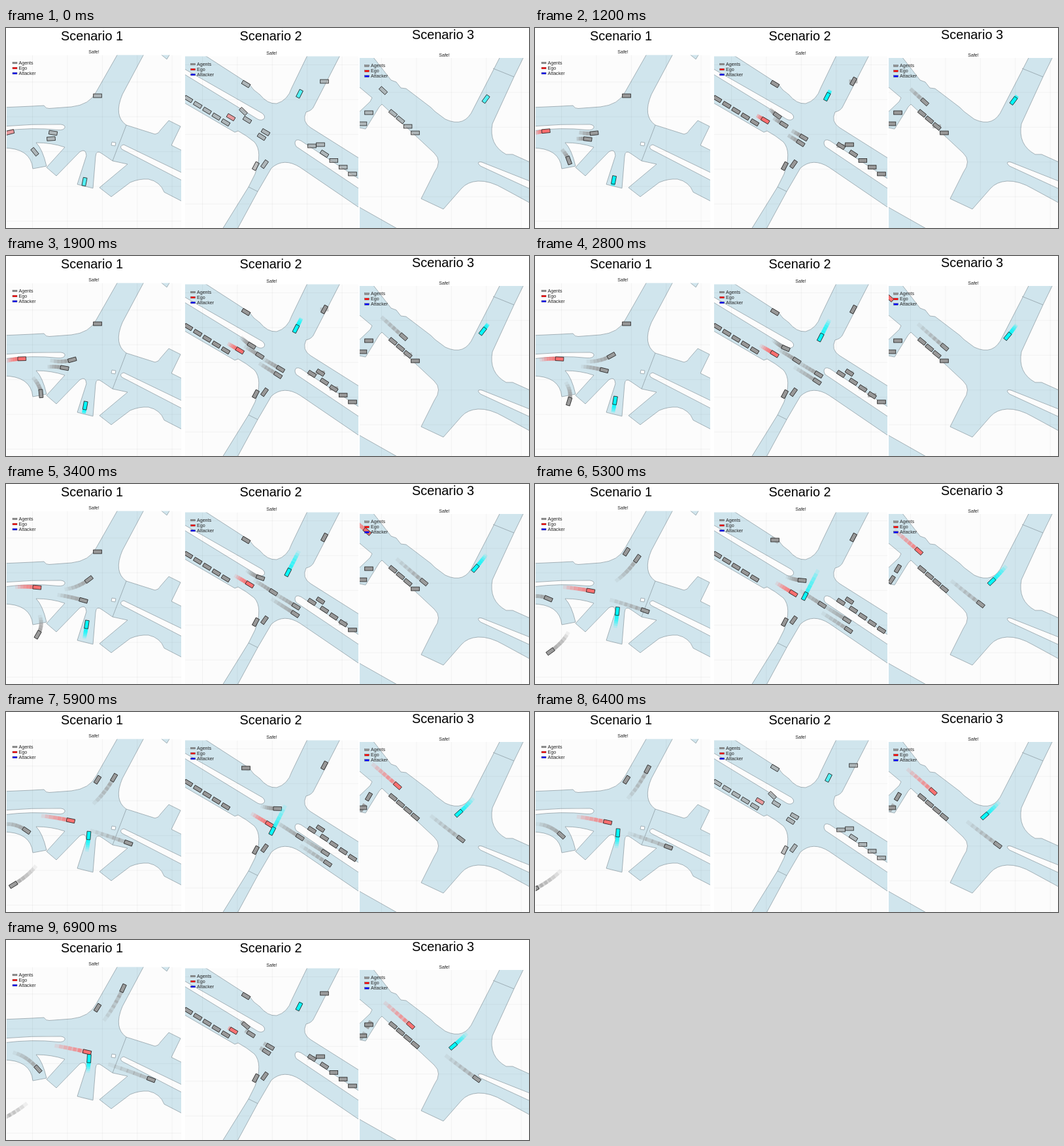
Animation of 800 by 307 pixels, one loop 7000 ms. Source, as an HTML page with a canvas:

```html
<!DOCTYPE html>
<html lang="en">
<head>
<meta charset="utf-8">
<title>Driving scenarios</title>
<style>
html, body { margin: 0; width: 100%; height: 100%; overflow: hidden; background: #fff; }
canvas { display: block; }
</style>
</head>
<body>
<canvas id="stage" width="800" height="307"></canvas>
<script>
const ctx = document.getElementById('stage').getContext('2d');
const ROAD = '#d0e5ed', GROUND = '#fcfcfc', EDGE = '#87969d';
const AGENT = '#989898', EGO = '#fb6c6c', ATTACKER = '#00f8fa';
const LAST = 66, TRAIL = 18, GAP = 3;

const mix = (a, b, u) => a + (b - a) * u;
// Attackers start from rest and slow down again
const ease = u => u * u * (2.2 - 1.2 * u);
const steady = u => u;

// A car following the parabola through its start, middle and end point
function driver(colour, [x0, y0], [x1, y1], [x2, y2], pace = steady) {
  const curve = (a, b, c, u) => a + u * (4 * b - 3 * a - c) + 2 * u * u * (a - 2 * b + c);
  const slope = (a, b, c, u) => 4 * b - 3 * a - c + 4 * u * (a - 2 * b + c);
  return {
    colour,
    pose(step) {
      const u = pace(step / LAST);
      return [curve(x0, x1, x2, u), curve(y0, y1, y2, u),
        Math.atan2(slope(y0, y1, y2, u), slope(x0, x1, x2, u))];
    }
  };
}

// A standing car, level at first, that snaps to its lane's angle between two steps
function parked(x, y, degrees, turn = 0, back = Infinity) {
  const angle = degrees * Math.PI / 180;
  return { colour: AGENT, pose: step => [x, y, step >= turn && step < back ? angle : 0] };
}

function row(count, [x0, y0], [x1, y1], degrees, turn = 0, stagger = 0) {
  return Array.from({ length: count }, (_, i) => {
    const u = i / (count - 1);
    return parked(mix(x0, x1, u), mix(y0, y1, u), degrees, turn + i * stagger);
  });
}

const panels = [
  {
    title: 'Scenario 1', tx: 131.5, ty: 19, x: 1, y: 41.5, w: 267, safe: 134.5, lx: 10, grid: [40, 29],
    roads: 'M-5 122L40 120 58 119Q61 124 66 123.5L100 121Q128 118 138 98L172 38H212L178 102Q164 135 184 149' +
      'L228 163Q234 162 236 157L249 142 267 151 253 180 273 190V268L242 252Q236 236 218 232 204 231 190 237' +
      'L161 259 143 245 186 209 163 204 147 193Q138 186 137 197L133 246 109 240 123 196Q122 184 113 190' +
      'L77 227 62 214 90 183Q70 176 46 176 56 186 62 212L41 216Q38 184 -5 184Z' +
      'M234 38L246 48 252 38Z',
    islands: 'M-5 151Q40 147 84 148 91 149 90 153 88 157 80 156.5 40 152 -5 158Z' +
      'M180 179L273 224V236L177 186Q173 181 180 179ZM162 175L168 176 167 181 161 180Z',
    line: 'M184 149L163 204',
    cars: [
      parked(140, 104, -58, 32),
      driver(AGENT, [72, 161], [130, 144], [179, 74]),
      driver(AGENT, [69, 170], [123, 180], [222, 214]),
      driver(AGENT, [44, 190], [47, 234], [-14, 279]),
      driver(AGENT, [-75, 233], [-11, 174], [49, 198]),
      driver(EGO, [6, 160], [51, 159], [124, 172]),
      driver(ATTACKER, [120, 236], [124.5, 208], [127, 182], ease)]
  },
  {
    title: 'Scenario 2', tx: 405, ty: 19, x: 274, y: 43.5, w: 265, safe: 406.5, lx: 282.5, grid: [300, 56], period: 61,
    roads: 'M268 40H301L372 86Q378 96 388 102 400 117 414 116 431 111 437 92L462 40H512L470 122' +
      'Q467 127 459 129 452 144 466 153L545 203V279L450 214Q425 198 406 215L385 251 352 312H329L371 244 381 224' +
      'Q393 190 380 175 368 165 355 158L350 160 268 112Z',
    islands: 'M268 60L392 131Q397 135 395 139 391 143 385 140L268 68Z' +
      'M451 173L545 235V250L444 182Q440 176 444 172 447 171 451 173Z',
    line: 'M371 244L385 251',
    cars: [
      ...row(5, [279, 109], [336, 145], 31),
      ...row(4, [487, 193], [530, 224], 33, 0, 11),
      parked(367, 86, 31, 0, 41), parked(487, 82, -62, 6), parked(382, 212, -62), parked(395.5, 209, -55),
      parked(468, 181, 33, 5), parked(481, 179, 33, 11),
      driver(AGENT, [363, 128], [391, 144.5], [427, 148]),
      driver(AGENT, [369, 141], [412, 168], [468, 204]),
      driver(AGENT, [397, 160], [447, 190], [508, 229]),
      driver(AGENT, [391, 167], [446, 202], [514, 247]),
      driver(EGO, [344, 137], [375, 155.5], [417, 181]),
      driver(ATTACKER, [449, 101], [424.5, 149], [400, 197], ease)]
  },
  {
    title: 'Scenario 3', tx: 668.5, ty: 17, x: 541, y: 46, w: 259, safe: 670.5, lx: 548.5, grid: [574, 45],
    roads: 'M535 40H558L589 80 597 83 604 92 612 93 650 122 656 128 672 140Q702 154 715 124L758 40H794' +
      'L777 75 744 147Q738 179 765 194L775 194 806 208V271L762 247Q740 234 722 235 706 236 697 246' +
      'L669 278 635 262 655 222Q668 204 655 192L575 117 571 121 550 155 535 152V134L557 113 560 107 535 86Z' +
      'M535 272L602 310H535Z',
    islands: 'M728 206L806 237V249L726 212Q721 208 723 206 725 205 728 206Z',
    line: 'M745 62L777 75',
    cars: [
      ...row(4, [592, 131], [626, 161], 39, -51, 28),
      parked(555, 130, -60, 33, 63), parked(545.5, 147, -57, 33, 55),
      driver(AGENT, [577, 96], [643.5, 154], [720, 213]),
      driver(EGO, [503, 32], [556, 76], [619, 131]),
      driver(ATTACKER, [734, 109], [711, 137], [684, 163], ease)]
  }
];

function box([x, y, angle], colour, alpha, outlined) {
  ctx.save();
  ctx.translate(x, y);
  ctx.rotate(angle);
  ctx.globalAlpha = alpha;
  ctx.fillStyle = colour;
  ctx.fillRect(-6.3, -2.9, 12.6, 5.8);
  if (outlined) {
    ctx.globalAlpha = 1;
    ctx.strokeStyle = '#222';
    ctx.lineWidth = 0.8;
    ctx.strokeRect(-6.3, -2.9, 12.6, 5.8);
  }
  ctx.restore();
}

function drawCar({ colour, pose }, step) {
  for (let age = TRAIL; age > 0; age -= GAP)
    if (step >= age) box(pose(step - age), colour, 0.6 - age * 0.026);
  box(pose(step), colour, Math.min(0.6 + step * 0.06, 0.95), true);
}

function text(str, x, y, size, align) {
  ctx.font = size + 'px "Liberation Sans", Arial, sans-serif';
  ctx.textAlign = align;
  ctx.fillText(str, x, y);
}

function shape(d, fill) {
  const path = new Path2D(d);
  ctx.fillStyle = fill;
  ctx.fill(path);
  ctx.stroke(path);
}

function drawGrid(p) {
  ctx.fillStyle = 'rgba(0,0,0,0.04)';
  for (let x = p.grid[0]; x < p.x + p.w; x += 53.4) ctx.fillRect(x, p.y, 1, 307);
  for (let y = p.grid[1]; y < 307; y += 53.4) ctx.fillRect(p.x, y, p.w, 1);
}

function drawLegend(p) {
  [['Agents', '#909090'], ['Ego', '#f00'], ['Attacker', '#00f']].forEach(([name, colour], i) => {
    const y = p.y + 12 + i * 8;
    ctx.fillStyle = colour;
    ctx.fillRect(p.lx, y - 1.2, 7, 2.6);
    ctx.strokeStyle = '#444';
    ctx.lineWidth = 0.35;
    ctx.strokeRect(p.lx, y - 1.2, 7, 2.6);
    ctx.fillStyle = '#222';
    text(name, p.lx + 9.5, y + 2.2, 7.1, 'left');
  });
}

function drawPanel(p, step) {
  if (p.period) step %= p.period;
  ctx.fillStyle = '#000';
  text(p.title, p.tx, p.ty, 19.9, 'center');
  ctx.fillStyle = '#222';
  text('Safe!', p.safe, p.y - 2.2, 7.1, 'center');

  ctx.save();
  ctx.beginPath();
  ctx.rect(p.x, p.y, p.w, 307 - p.y);
  ctx.clip();
  ctx.fillStyle = GROUND;
  ctx.fillRect(p.x, p.y, p.w, 307);
  ctx.strokeStyle = EDGE;
  ctx.lineWidth = 0.7;
  shape(p.roads, ROAD);
  shape(p.islands, GROUND);
  ctx.stroke(new Path2D(p.line));
  drawGrid(p);
  p.cars.forEach(car => drawCar(car, step));
  drawLegend(p);
  ctx.restore();
}

// One step per 100 ms, with a longer hold at the start and after the tenth step
function stepAt(ms) {
  const tick = Math.floor(ms / 100);
  return tick < 13 ? Math.max(tick - 2, 0) : tick - 3;
}

function draw() {
  const step = stepAt(performance.now() % 7000);
  ctx.fillStyle = '#fff';
  ctx.fillRect(0, 0, 800, 307);
  panels.forEach(p => drawPanel(p, step));
  requestAnimationFrame(draw);
}
draw();
</script>
</body>
</html>
```
